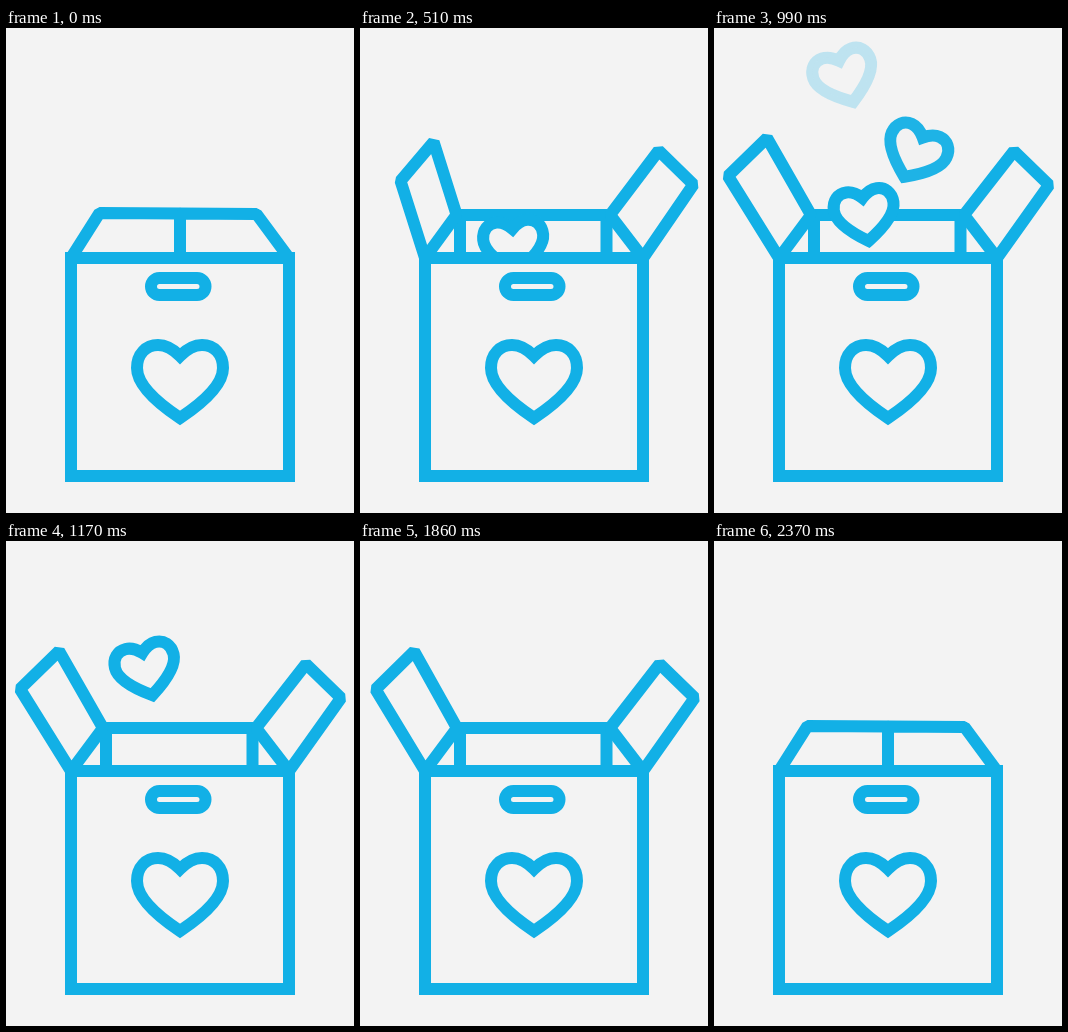
An HTML page with a canvas for the animation above (3030 ms loop, 348x485 px).

```html
<!DOCTYPE html>
<html lang="en">
<head>
<meta charset="utf-8">
<title>Gift box</title>
<style>
html, body { margin: 0; height: 100%; overflow: hidden; background: #f3f3f3; }
canvas { display: block; }
</style>
</head>
<body>
<canvas id="stage" width="348" height="485"></canvas>
<script>
const LOOP = 3030, STEP = 30, BLUE = '#12b0e6', PAPER = '#f3f3f3';
const ctx = document.getElementById('stage').getContext('2d');

// Heart outline around its own centre
const heart = new Path2D('M0 36C-24 20-43 2-43-14C-43-28-34-37-22-37C-13-37-6-32 0-26C6-32 13-37 22-37C34-37 43-28 43-14C43 2 24 20 0 36Z');

// Flap poses from closed (at 0) to open (at 1)
const left = {
  hinge: [65, 230], back: [[93.5, 185], [97, 187]],
  at: [0, .517, .873, 1],
  front: [[174, 230], [118, 163], [41, 153], [14, 148]],
  rear: [[174, 185.5], [135, 122], [74, 114], [53, 110]],
  open: [105, 645], close: [1830, 2315]
};
const right = {
  hinge: [283, 230], back: [[250.5, 186], [250, 187]],
  at: [0, .632, 1],
  front: [[174, 230], [253, 148], [335, 157]],
  rear: [[174, 185.5], [231, 113], [300, 123]],
  open: [0, 540], close: [1846, 2370]
};

// Position and turn at 990 ms, with speeds per ms; gone at `end`
const flying = [
  { x: 131, y: 50, turn: -19, vx: -.048, vy: -.256, ay: .0002, spin: -.029, end: 1030 },
  { x: 201, y: 126, turn: 25, vx: .085, vy: -.31, ay: .00011, spin: .03, end: 1150 },
  { x: 151, y: 188, turn: -8, vx: -.058, vy: -.36, ay: .0002, spin: -.03, end: 1370 }
];

const clamp = v => Math.max(0, Math.min(1, v));
const ease = p => p < .5 ? 2 * p * p : 1 - 2 * (1 - p) ** 2;
const progress = (t, [a, b]) => ease(clamp((t - a) / (b - a)));

// Smooth curve through all points (Lagrange)
function through(at, points, u) {
  let x = 0, y = 0;
  points.forEach((p, i) => {
    const w = at.reduce((m, a, j) => j === i ? m : m * (u - a) / (at[i] - a), 1);
    x += w * p[0];
    y += w * p[1];
  });
  return [x, y];
}

function paint(path, width = 12) {
  ctx.lineWidth = width;
  ctx.fill(path);
  ctx.stroke(path);
}

function drawHeart(x, y, scale = 1, turn = 0) {
  ctx.save();
  ctx.translate(x, y);
  ctx.rotate(turn * Math.PI / 180);
  ctx.scale(scale, scale);
  paint(heart, 12 / scale);
  ctx.restore();
}

function drawFlying(h, t) {
  const s = t - 990;
  ctx.globalAlpha = clamp((h.end - t) / 170);
  drawHeart(h.x + h.vx * s, h.y + h.vy * s + h.ay * s * s, .7, h.turn + h.spin * s);
  ctx.globalAlpha = 1;
}

function drawFlap(f, t) {
  const u = progress(t, f.open) - progress(t, f.close);
  const corners = [
    f.hinge,
    through(f.at, f.front, u),
    through(f.at, f.rear, u),
    through([0, 1], f.back, u)
  ];
  ctx.lineJoin = 'bevel';
  paint(new Path2D('M' + corners.join('L') + 'Z'));
  ctx.lineJoin = 'miter';
}

function drawFront() {
  const box = new Path2D(), handle = new Path2D();
  box.rect(65, 230, 218, 218);
  handle.roundRect(145, 250, 54.5, 17, 8.5);
  paint(box);
  paint(handle);
  drawHeart(174, 354);
}

function draw(t) {
  ctx.fillStyle = PAPER;
  ctx.strokeStyle = BLUE;
  ctx.fillRect(0, 0, 348, 485);
  ctx.lineWidth = 12;
  ctx.stroke(new Path2D('M94 187H253M100 187V230M246.5 187V230'));
  if (t > 400) flying.forEach(h => drawFlying(h, t));
  drawFlap(left, t);
  drawFlap(right, t);
  drawFront();
}

const start = performance.now();
function tick() {
  const t = (performance.now() - start) % LOOP;
  draw(Math.floor(t / STEP) * STEP);
  requestAnimationFrame(tick);
}
tick();
</script>
</body>
</html>
```
